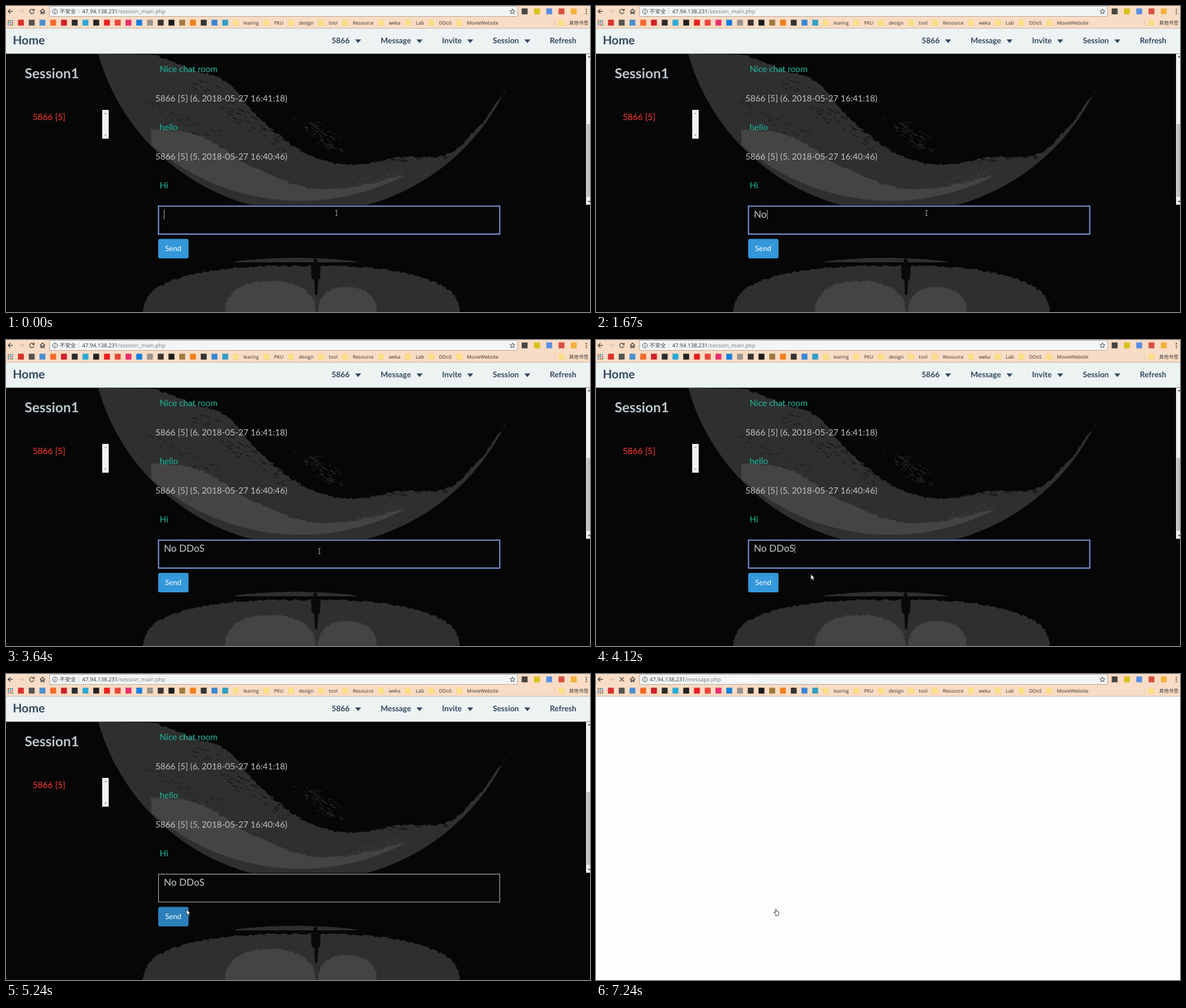
Write an HTML page that moves like this. It is 1032x542 px and loops after 8000 ms.

```html
<!DOCTYPE html>
<html lang="zh-CN">
<head>
<meta charset="utf-8">
<title>Chat session</title>
<style>
html, body { margin: 0; width: 100%; height: 100%; overflow: hidden; background: #fefefe; }
svg { display: block; width: 100%; height: 100%; }
text { white-space: pre; text-rendering: geometricPrecision; }
.ui { font-family: "Open Sans", "Noto Sans CJK SC", "Noto Sans CJK", sans-serif; }
.web { font-family: Lato, sans-serif; }
.bold { font-weight: 700; }
</style>
</head>
<body>
<svg id="stage" viewBox="0 0 1032 542" xmlns="http://www.w3.org/2000/svg">
  <defs>
    <clipPath id="tail"><rect x="223" y="0" width="80" height="18"/></clipPath>
    <clipPath id="sky"><rect y="84" width="1032" height="268.5"/></clipPath>
  </defs>
  <rect width="1032" height="542" fill="#fefefe"/>
  <g id="page">
    <rect y="84" width="1032" height="458" fill="#060606"/>
    <g id="moon" clip-path="url(#sky)"></g>
    <g id="pool"></g>
    <rect y="40" width="1032" height="44.5" fill="#edf2f3"/>
    <g id="nav"></g>
    <g id="chat"></g>
    <rect id="box" x="269.5" y="354.5" width="603" height="49.5" fill="#060606"/>
    <text id="draft" class="web" x="279" y="374.5" font-size="17.2" fill="#c3cbd0"></text>
    <rect id="caret" y="361" width="1" height="17" fill="#a9b0b4"/>
    <rect id="send" x="269" y="412.5" width="53.5" height="34.5" rx="3"/>
    <text class="web" x="281.2" y="433.7" font-size="13.1" fill="#fff">Send</text>
  </g>
  <g id="chrome">
    <rect width="1032" height="39.5" fill="#f9dcc5"/>
    <rect y="39" width="1032" height="1" fill="#c9b8aa"/>
    <rect x="77" y=".5" width="827" height="18" rx="1" fill="#f2f5f6" stroke="#b8a698"/>
    <g fill="none" stroke="#444" stroke-width="1.3">
      <path d="M12,9.5H4M7.8,5.5l-4,4l4,4"/>
      <path d="M23,9.5h8M27.2,5.5l4,4l-4,4" stroke="#dcc3b0"/>
      <path id="reload" d="M48.8,7A4,4 0 1 0 49.6,10.6M49.7,5v3.2h-3.2"/>
      <path id="stop" d="M42,5.8l7.5,7.5M49.5,5.8l-7.5,7.5"/>
      <path d="M60.2,9.8l4.4,-4.4l4.4,4.4M61.7,9v4.7h1.8v-3h2.2v3h1.8V9"/>
      <circle cx="86.5" cy="9.7" r="4.2" stroke-width="1"/>
      <path d="M86.5,9v3M86.5,7v1" stroke-width="1"/>
      <path d="M895,5.2l1.3,2.9l3.1,.3l-2.3,2.1l.7,3.1l-2.8,-1.6l-2.8,1.6l.7,-3.1l-2.3,-2.1l3.1,-.3z" stroke-width="1"/>
    </g>
    <path d="M1025.5,5v2M1025.5,8.7v2M1025.5,12.4v2" stroke="#444" stroke-width="2"/>
    <g class="ui" font-size="9.65">
      <g id="oldUrl">
        <text x="94.8" y="13" fill="#444">不安全</text>
        <path d="M128.5,5v9" stroke="#c4c4c4"/>
        <text x="134.8" y="13" fill="#333">47.94.138.231<tspan fill="#7a7a7a">/session_main.php</tspan></text>
      </g>
      <g id="newUrl">
        <text x="134.8" y="13" fill="#fff" stroke="#fff" stroke-width=".5" clip-path="url(#tail)">47.94.138.231/session_main.php</text>
        <text x="94.8" y="13" fill="#333">47.94.138.231<tspan fill="#7a7a7a">/message.php</tspan></text>
      </g>
    </g>
    <g id="marks"></g>
  </g>
  <g id="pointer" stroke-linejoin="round">
    <path id="beam" d="M-2,-4.5h1.5l.5,.5l.5,-.5h1.5M0,-4v8.5M-2,5h1.5l.5,-.5l.5,.5h1.5" fill="none" stroke="#b5b5b5"/>
    <path id="arrow" d="M0,0v9.5l2.2,-2l1.6,3.6l1.7,-.8l-1.6,-3.4h3z" fill="#fff" stroke="#111" stroke-width=".7"/>
    <path id="hand" d="M-1.9,-5q.9,-1.2 1.8,0v3.2l3.4,.8q1.2,.5 1,2l-.9,3.2v1.8h-4.8v-1.5l-2.9,-3.8q-.4,-1.3 .9,-1.2l1.5,1.3z" fill="#fff" stroke="#222" stroke-width=".9"/>
  </g>
</svg>
<script>
const LOOP = 8000;
const USER = "5866";
const DARK = "#2f2f2f", LIGHT = "#444", NIGHT = "#0a0a0a";
const $ = id => document.getElementById(id);

function add(parent, tag, attrs, text) {
  const el = document.createElementNS("http://www.w3.org/2000/svg", tag);
  for (const key in attrs) el.setAttribute(key, attrs[key]);
  if (text) el.textContent = text;
  return $(parent).appendChild(el);
}
const show = (id, on) => $(id).setAttribute("visibility", on ? "visible" : "hidden");
const shape = (parent, d, fill) => add(parent, "path", { d, fill });

let seed = 17;
function rand() {
  seed = (seed * 16807) % 2147483647;
  return seed / 2147483647;
}
const mix = (a, b, f) => a + (b - a) * f;
const point = (x, y, wobble) =>
  (x + (rand() - .5) * wobble).toFixed(1) + "," + (y + (rand() - .5) * wobble).toFixed(1);

// Smooth curve through the key points, with a ragged edge
function ragged(keys, wobble) {
  const out = [];
  const at = i => keys[Math.max(0, Math.min(keys.length - 1, i))];
  const spline = (a, b, c, d, f) =>
    b + f * (c - a + f * (2 * a - 5 * b + 4 * c - d + f * (3 * (b - c) + d - a))) / 2;
  for (let i = 0; i < keys.length - 1; i++)
    for (let f = 0; f < 1; f += .05) {
      const axis = n => spline(at(i - 1)[n], at(i)[n], at(i + 1)[n], at(i + 2)[n], f);
      out.push(point(axis(0), axis(1), wobble));
    }
  return out.join("L");
}

// Upper half of a superellipse
function dome(cx, base, rx, ry, power, wobble, fill) {
  const out = [];
  for (let a = 0; a <= 180; a++) {
    const u = Math.cos(a * Math.PI / 180);
    out.push(point(cx + rx * u, base - ry * (1 - Math.abs(u) ** power) ** (1 / power), wobble));
  }
  shape("pool", `M${out.join("L")}Z`, fill);
}

// Short slanted strokes scattered along a line
function streaks(x0, y0, x1, y1, count, spread, stroke) {
  let d = "";
  for (let i = 0; i < count; i++) {
    const f = rand(), len = 2 + rand() * 6;
    d += `M${point(mix(x0, x1, f), mix(y0, y1, f), spread)}l${len.toFixed(1)},${(len * .5).toFixed(1)}`;
  }
  add("moon", "path", { d, stroke, fill: "none" });
}

function drawPhoto() {
  const edge = [[882, 150], [836, 213], [780, 263], [700, 268], [600, 281], [515, 252], [440, 191], [390, 134], [330, 112], [255, 84]];
  shape("moon", `M163,85A386.5,386.5 0 0 0 882,150L${ragged(edge, 4)}Z`, DARK);
  const glow = [[258, 218], [345, 231], [438, 287], [560, 325], [705, 300]];
  shape("moon", `M${ragged(glow, 4)}L705,300A400,400 0 0 1 257,246Z`, LIGHT);
  streaks(330, 135, 510, 250, 90, 32, NIGHT);
  streaks(240, 165, 380, 235, 50, 28, "#1a1a1a");
  streaks(520, 200, 580, 245, 70, 26, DARK);
  streaks(590, 325, 700, 292, 40, 16, LIGHT);
  streaks(610, 275, 780, 264, 40, 7, NIGHT);

  dome(512, 454, 110, 8, 1.6, .8, DARK);
  dome(522, 543, 279, 83, 2.5, 3.5, DARK);
  dome(467, 543, 80, 56, 2.3, 3.5, LIGHT);
  dome(603, 543, 52, 45, 2.3, 3.5, LIGHT);
  shape("pool", "M539,458h17l-1,25l-3,3l-2,26h-4l-1,-26l-5,-4z", NIGHT);
  shape("pool", "M544,460v-8a3.3,3.3 0 1 1 6,0v8z", NIGHT);
}

function drawPage() {
  const ink = "#34495e";
  const label = (parent, x, y, size, fill, text, weight = "") =>
    add(parent, "text", { class: "web " + weight, x, y, "font-size": size, fill }, text);
  const block = (x, y, width, height, fill) => add("chat", "rect", { x, y, width, height, fill });

  label("nav", 12, 68, 21, ink, "Home", "bold");
  let x = 575.3;
  for (const text of [USER, "Message", "Invite", "Session", "Refresh"]) {
    const item = label("nav", x, 66, 13.8, ink, text, "bold");
    x += item.getComputedTextLength() + 14.9;
    if (text !== "Refresh") shape("nav", `M${x - 5.3},59.3h10.6l-5.3,6.4z`, ink);
    x += 39.8;
  }

  label("chat", 33, 127.7, 24.4, "#bdc9d0", "Session1", "bold");
  label("chat", 47, 202, 15.4, "#fb3a30", USER + " [5]");
  block(170, 184, 11.5, 51, "#f1f1f1");
  shape("chat", "M173.3,191.5h5l-2.5,-2.7zM173.3,227.5h5l-2.5,2.7z", "#a3a3a3");
  block(1025, 85, 7, 267, "#f1f1f1");
  block(1026, 209, 6, 129, "#c1c1c1");
  shape("chat", "M1028,91h5l-2.5,-3zM1028,345h5l-2.5,3z", "#505050");

  const lines = ["Nice chat room", USER + " [5] (6, 2018-05-27 16:41:18)", "hello",
    USER + " [5] (5, 2018-05-27 16:40:46)", "Hi"];
  lines.forEach((text, i) => {
    const header = i % 2;
    label("chat", header ? 264 : 271.5, 117.3 + 51.5 * i, 15.3, header ? "#bdc3c7" : "#1abc9c", text);
  });
}

function drawMarks() {
  const badge = (cx, cy, fill) =>
    add("marks", "rect", { x: cx - 5.2, y: cy - 5.2, width: 10.4, height: 10.4, fill });
  const folder = (cx, text) => {
    add("marks", "path", { d: `M${cx - 4.5},24.5h6l1,1.5h2v8.5h-9z`, fill: "#fbe184", stroke: "#efcf70", "stroke-width": .6 });
    const name = add("marks", "text", { class: "ui", x: cx + 13.5, y: 33, "font-size": 8.55, fill: "#333" }, text);
    return name.getComputedTextLength();
  };

  const dots = ["#db4437", "#0f9d58", "#4285f4"];
  for (let i = 0; i < 9; i++) {
    const col = i % 3, row = (i - col) / 3;
    add("marks", "rect", { x: 3 + col * 3.6, y: 25 + row * 3.6, width: 2.3, height: 2.3, fill: dots[(col + row) % 3] });
  }

  const sites = "#d8322d #55534f #4a8fd0 #f5692a #cf2027 #2b2b2b #29a9d6 #222 #e8201f #e8453c " +
    "#ea2f6c #1480e0 #9b948d #39332f #1b1b1b #a2793f #ef7f1a #333 #3a86d8 #2f9fc4";
  sites.split(" ").forEach((fill, i) => badge(26.4 + 19 * i, 29.5, fill));
  const tools = "#484441 #d8c21a #5a8fe6 #d9503f #f3b23c";
  tools.split(" ").forEach((fill, i) => badge(916.5 + 21.7 * i, 9.5, fill));

  let cx = 406;
  for (const text of ["learing", "PKU", "design", "tool", "Resource", "weka", "Lab", "DDoS", "MovieWebsite"])
    cx += folder(cx, text) + 26.9;
  folder(981.5, "其他书签");
  add("marks", "path", { d: "M969.5,24v11", stroke: "#d9bfac" });
}

const DRAFT = "No DDoS";
const KEYS = [1210, 1670, 1830, 2040, 2290, 2660, 3040];

// The mouse glides in twelve eased steps from the text box to the button
function pointerAt(t) {
  if (t >= 4570) return [319, 422];
  if (t >= 4490) return [306, 426];
  const step = Math.max(0, Math.min(12, Math.floor((t - 3640) / 68.5) + 1));
  const ease = 1 - (1 - step / 12) ** 1.43;
  return [mix(584, 326, ease), mix(366.5, 415, Math.min(1, ease / .79))];
}

function render(t) {
  const loading = t >= 5460, moved = t >= 5920;
  show("page", t < 7240);
  show("reload", !loading);
  show("stop", loading);
  show("oldUrl", !moved);
  show("newUrl", moved);

  $("draft").textContent = DRAFT.slice(0, KEYS.filter(k => t >= k).length);
  const lit = t < 430 || (t >= 980 && t < 3640) || (t >= 4120 && t < 4490);
  $("caret").setAttribute("x", Math.round(279 + $("draft").getComputedTextLength()));
  $("caret").setAttribute("opacity", lit ? 1 : 0);

  const focus = t < 5020;
  $("box").setAttribute("stroke", focus ? "#7d9be2" : "#c9c9c9");
  $("box").setAttribute("stroke-width", focus ? 2 : 1);

  const pressed = t >= 5160 && t < 5460;
  $("send").setAttribute("fill", t < 4730 ? "#3498db" : pressed ? "#2c81ba" : "#5dade2");

  const [x, y] = pointerAt(t);
  const busy = t >= 5240 && t < 5690;
  const kind = y < 404 ? "beam" : t < 4490 || busy ? "arrow" : "hand";
  for (const id of ["beam", "arrow", "hand"]) show(id, id === kind);
  $("pointer").setAttribute("transform", `translate(${x},${busy ? y - 5 : y})`);
}

drawPhoto();
drawPage();
drawMarks();
const start = performance.now();
function tick() {
  render((performance.now() - start) % LOOP);
  requestAnimationFrame(tick);
}
tick();
</script>
</body>
</html>
```
